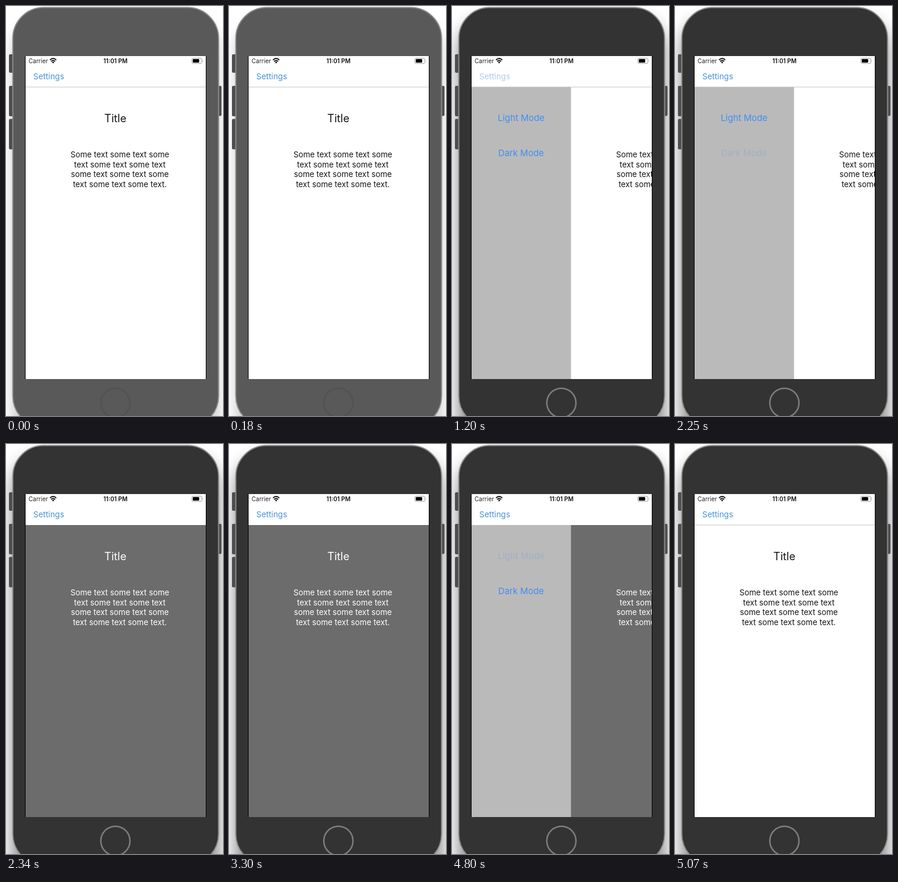
Animation, 366 px wide and 688 px high, one loop 5.25 s. Source, as an HTML page:

```html
<!DOCTYPE html>
<html lang="en">
<head>
<meta charset="utf-8">
<title>Light and dark mode</title>
<style>
html, body { margin: 0; width: 100%; height: 100%; overflow: hidden; background: #fff; }
svg { display: block; width: 366px; height: 688px; }
text { font-family: Inter, Roboto, sans-serif; }
.mid { text-anchor: middle; }
.small { font-size: 10px; }
.bold { font-weight: 600; }
.copy { font-size: 13.3px; }
.menu { font-size: 14.8px; fill: #438ef4; }
</style>
</head>
<body>
<svg viewBox="0 0 366 688">
  <defs>
    <filter id="blur" x="-20%" y="-20%" width="140%" height="140%"><feGaussianBlur id="spread"/></filter>
    <clipPath id="screen"><rect x="33" y="84" width="304" height="542"/></clipPath>
  </defs>

  <rect id="shadow" x="11" y="24" width="348" height="720" rx="50" filter="url(#blur)"/>
  <g fill="#4d4d4d">
    <rect x="5" y="81" width="9" height="31" rx="2"/>
    <rect x="5" y="134" width="9" height="51" rx="2"/>
    <rect x="5" y="189.5" width="9" height="51" rx="2"/>
    <rect x="355" y="134" width="8.5" height="50.5" rx="2"/>
  </g>
  <rect id="shell" x="11.5" y="2.5" width="347" height="704" rx="52" stroke="#8a8d8d" stroke-width="1.9"/>
  <circle id="home" cx="184.5" cy="666" r="24.6" fill="none" stroke-width="2.5"/>

  <rect x="32" y="84" width="306" height="542" fill="#000"/>
  <g clip-path="url(#screen)">
    <rect x="33" y="84" width="304" height="542" fill="#fff"/>
    <rect id="page" x="33" y="136" width="304" height="490"/>
    <rect id="rule" x="33" y="135" width="304" height="2" fill="#e2e2e2"/>
    <g id="content" class="mid">
      <text id="title" x="184.5" y="195" font-size="18.3">Title</text>
      <g id="copy" class="copy"></g>
    </g>
    <g id="drawer" class="mid menu">
      <rect x="33" y="136" width="167.7" height="490" fill="#bababa"/>
      <text id="light" x="116.5" y="193">Light Mode</text>
      <text id="dark" x="116.5" y="252.3">Dark Mode</text>
    </g>

    <text class="small" x="38" y="96" fill="#222">Carrier</text>
    <g fill="none" stroke="#111" stroke-width="1.9">
      <path d="M74.2 90.6Q79.5 85.6 84.8 90.6M76.1 93Q79.5 89.8 82.9 93"/>
      <path d="M77.6 94.4Q79.5 92.7 81.4 94.4L79.5 96.4Z" fill="#111" stroke="none"/>
    </g>
    <text class="small bold mid" x="184.7" y="96" fill="#111">11:01 PM</text>
    <rect x="313.5" y="87.5" width="17" height="9" rx="2.5" fill="none" stroke="#a2a2a2"/>
    <rect x="315" y="89" width="10.8" height="6" rx="1.2" fill="#000"/>
    <path d="M331.8 90.5q1.4 1.5 0 3z" fill="#a2a2a2"/>
    <text id="settings" x="46" y="123" font-size="13.5" fill="#4893d6">Settings</text>
  </g>
</svg>
<script>
const LOOP = 5250, SHIFT = 168, DIM = 0.18;
const $ = id => document.getElementById(id);
const set = (id, name, value) => $(id).setAttribute(name, value);
const within = (t, a, b) => t >= a && t < b;

$("copy").innerHTML = [
  "Some text some text some",
  "text some text some text",
  "some text some text some",
  "text some text some text."
].map((line, i) => `<text x="192" y="${254.2 + i * 16.5}">${line}</text>`).join("");

// Held at DIM from press to release, then eased back over 300 ms.
function pressed(t, down, up) {
  if (t < down) return 1;
  const p = Math.min(1, Math.max(0, (t - up) / 300));
  return DIM + (1 - DIM) * p * p * (3 - 2 * p);
}

function draw(t) {
  const active = t >= 930;
  const open = within(t, 1080, 2340) || within(t, 3900, 4830);
  const night = within(t, 2340, 4830);

  set("spread", "stdDeviation", active ? 15 : 11);
  set("shadow", "opacity", active ? 0.47 : 0.2);
  set("shell", "fill", active ? "#333" : "#595959");
  set("home", "stroke", active ? "#7d7d7d" : "#525252");

  set("page", "fill", night ? "#6c6c6c" : "#fff");
  set("rule", "visibility", night ? "hidden" : "visible");
  set("content", "fill", night ? "#fff" : "#161616");
  set("content", "transform", `translate(${open ? SHIFT : 0} 0)`);
  set("title", "visibility", open ? "hidden" : "visible");
  set("drawer", "visibility", open ? "visible" : "hidden");

  set("settings", "opacity", Math.min(pressed(t, 930, 1080), pressed(t, 3690, 3900)));
  set("dark", "opacity", within(t, 2250, 2340) ? 0.22 : 1);
  set("light", "opacity", within(t, 4500, 4830) ? 0.22 : 1);
}

let start;
function tick(now) {
  start ??= now;
  draw((now - start) % LOOP);
  requestAnimationFrame(tick);
}
draw(0);
requestAnimationFrame(tick);
</script>
</body>
</html>
```
